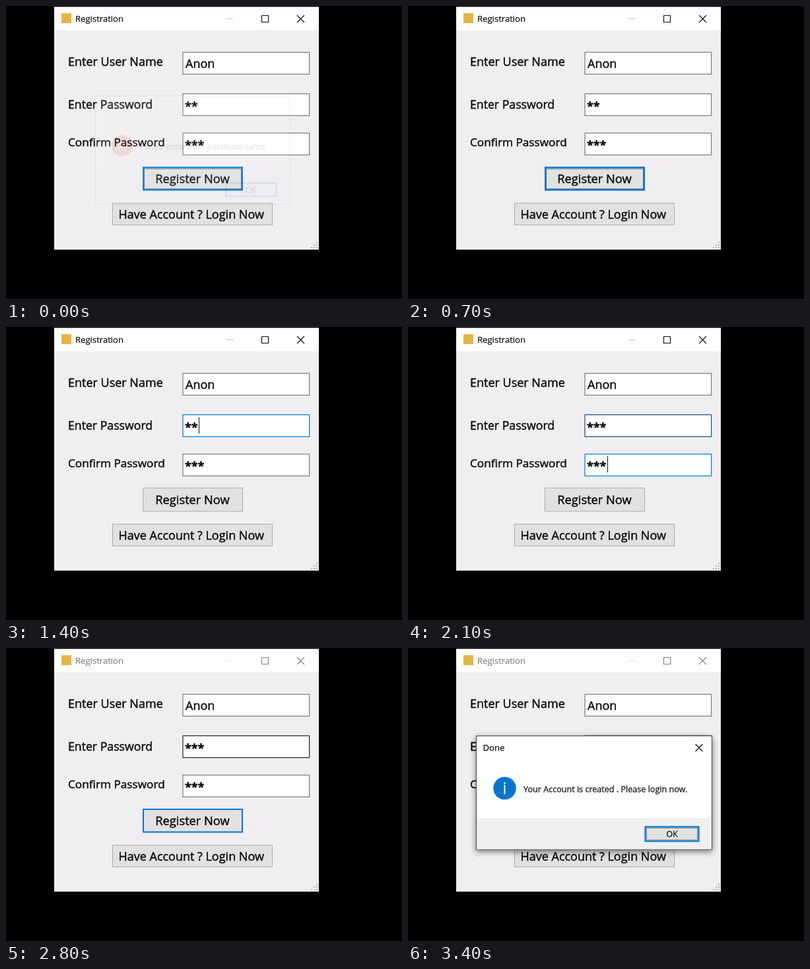
An HTML page for the animation above (3.5 s loop, 600 by 445 pixels).

```html
<!DOCTYPE html>
<html lang="en">
<head>
<meta charset="utf-8">
<title>Registration</title>
<style>
html, body { margin: 0; width: 100%; height: 100%; overflow: hidden; background: #000; }
svg { display: block; width: 600px; height: 445px; font-family: "Open Sans", "Noto Sans", sans-serif; }
.form { font-size: 18px; }
.form text { fill: #0c0c0c; stroke: #0c0c0c; stroke-width: 0.45px; }
.stars { font-weight: 700; }
.title { font-size: 13.1px; stroke: #000; stroke-width: 0.15px; }
.message { font-size: 12.6px; fill: #1c1c1c; stroke: #1c1c1c; stroke-width: 0.3px; }
.message.small { font-size: 12px; }
.line { fill: none; stroke: #111; }
.face { fill: #e1e1e1; stroke: #adadad; }
.focus { fill: none; stroke: #222; stroke-dasharray: 1 1; }
#done { filter: drop-shadow(0 3px 5px rgba(0, 0, 0, 0.5)); }
</style>
</head>
<body>
<svg viewBox="0 0 600 445">
  <rect width="600" height="445" fill="#000"/>
  <rect x="73" y="1.500" width="401" height="368.500" fill="#f0eef0"/>
  <rect x="73" y="1.500" width="401" height="35.500" fill="#fff"/>
  <rect x="84" y="11" width="15" height="15" fill="#e5b544"/>
  <g id="caption">
    <text class="title" x="105" y="24">Registration</text>
    <path class="line" d="M387.500 14.500h10v10h-10zM441 14l11 11m0-11l-11 11" stroke-width="1.200"/>
  </g>
  <path id="minimize" class="line" d="M333.500 19.500h11"/>
  <g id="grip" fill="#b5b3b5"></g>

  <g class="form">
    <text x="94" y="91">Enter User Name</text>
    <text x="94" y="156" font-size="17.700">Enter Password</text>
    <text x="94" y="213" font-size="17.200">Confirm Password</text>
    <g fill="#fff" stroke="#7a7a7a" stroke-width="1.200">
      <rect x="268" y="70.300" width="191.600" height="33.200"/>
      <rect id="passwordBox" x="268" y="133.300" width="191.600" height="33.200"/>
      <rect id="confirmBox" x="268" y="193" width="191.600" height="33.200"/>
    </g>
    <text x="272" y="94">Anon</text>
    <text id="password" class="stars" x="271" y="159"></text>
    <text class="stars" x="271" y="218">***</text>
    <path id="caret" class="line"/>
    <rect id="register" class="face"/>
    <rect id="registerFocus" class="focus" x="209.500" y="247.500" width="147" height="30"/>
    <text x="282.500" y="269" font-size="18.300" text-anchor="middle">Register Now</text>
    <rect class="face" x="161.500" y="299.500" width="242" height="33"/>
    <text x="170.500" y="323">Have Account ? Login Now</text>
  </g>

  <g id="error">
    <rect x="135.500" y="136.500" width="294" height="165" fill="#fff" stroke="#777"/>
    <rect x="136" y="256" width="293" height="45" fill="#f0f0f0"/>
    <circle cx="176" cy="212" r="16" fill="#e23b2e"/>
    <path d="M170 206l12 12m0-12l-12 12" stroke="#fff" stroke-width="2.500"/>
    <text class="message small" x="203" y="218">Please enter both password same</text>
    <rect x="333" y="269" width="77" height="20" fill="#e1e1e1" stroke="#0078d7" stroke-width="2"/>
    <text class="message small" x="371" y="284" text-anchor="middle">OK</text>
  </g>

  <g id="done">
    <rect x="103.500" y="133.500" width="357" height="172.500" fill="#fff" stroke="#444"/>
    <rect x="104" y="258" width="356" height="47.500" fill="#f0f0f0"/>
    <text class="title" x="113.500" y="156">Done</text>
    <path class="line" d="M435.500 146l11 11m0-11l-11 11" stroke-width="1.300"/>
    <circle cx="146.500" cy="213" r="17.300" fill="#0874d1"/>
    <text x="146.500" y="222" text-anchor="middle" font-size="25" fill="#fff">i</text>
    <text class="message" x="175" y="219">Your Account is created . Please login now.</text>
    <rect x="359.500" y="271.500" width="81" height="22" fill="#e1e1e1" stroke="#0078d7" stroke-width="2.200"/>
    <rect class="focus" x="361.500" y="273.500" width="77" height="18"/>
    <text class="message" x="400" y="287" text-anchor="middle">OK</text>
  </g>
</svg>
<script>
const LOOP = 3500, STEP = 100;
const BLUE = '#0078d7', GRAY = '#7a7a7a';
const el = id => document.getElementById(id);
const set = (id, attrs) => {
  for (const name in attrs) el(id).setAttribute(name, attrs[name]);
};
const ramp = (t, from, to) => Math.min(1, Math.max(0, (t - from) / (to - from)));
const mix = (a, b, k) => `rgb(${a.map((v, i) => Math.round(v + (b[i] - v) * k))})`;

for (let row = 0; row < 3; row++)
  for (let col = 2 - row; col < 3; col++)
    el('grip').innerHTML += `<rect x="${462 + col * 4}" y="${358 + row * 4}" width="2" height="2"/>`;

function registerStyle(t) {
  if (t < 1000) return ['#e1e1e1', BLUE, 2.5];
  if (t < 2400) return ['#e1e1e1', '#adadad', 1];
  if (t < 2500) return ['#e5f1fb', BLUE, 1];
  if (t < 2600) return ['#cce4f7', '#005499', 2];
  return ['#e1e1e1', BLUE, 2];
}

function passwordBorder(t) {
  if (t < 1000) return GRAY;
  if (t < 1900) return BLUE;
  return mix([0, 120, 215], [34, 34, 34], ramp(t, 1800, 2400));
}

function draw(t) {
  const active = t < 2700;
  set('caption', { opacity: active ? 1 : 0.5 });
  set('minimize', { opacity: active ? 0.25 : 0.1 });

  const stars = t < 1600 ? '**' : '***';
  el('password').textContent = stars;
  set('passwordBox', { stroke: passwordBorder(t) });
  const inConfirm = t >= 1900 && t < 2500;
  set('confirmBox', { stroke: inConfirm ? BLUE : GRAY });

  const typing = t >= 1000 && t < 2500;
  const x = stars.length === 3 ? 302.5 : 292.5;
  set('caret', { d: `M${x} ${inConfirm ? 196 : 137}v25`, opacity: typing ? 1 : 0 });

  const [fill, stroke, width] = registerStyle(t);
  const inset = width / 2;
  set('register', {
    style: `fill:${fill};stroke:${stroke}`, 'stroke-width': width,
    x: 207 + inset, y: 244 + inset, width: 152 - width, height: 36.5 - width
  });
  set('registerFocus', { opacity: t < 1000 ? 1 : 0 });

  set('error', { opacity: t < 100 ? 0.11 : 0 });
  const shown = t < 3000 ? 0 : t < 3100 ? 0.76 : 1;
  const scale = 0.992 + 0.008 * ramp(t, 3000, 3100);
  set('done', {
    opacity: shown,
    transform: `translate(282 219.5) scale(${scale}) translate(-282 -219.5)`
  });
}

const start = performance.now();
function tick() {
  const t = (performance.now() - start) % LOOP;
  draw(Math.floor(t / STEP) * STEP);
  requestAnimationFrame(tick);
}
tick();
</script>
</body>
</html>
```
